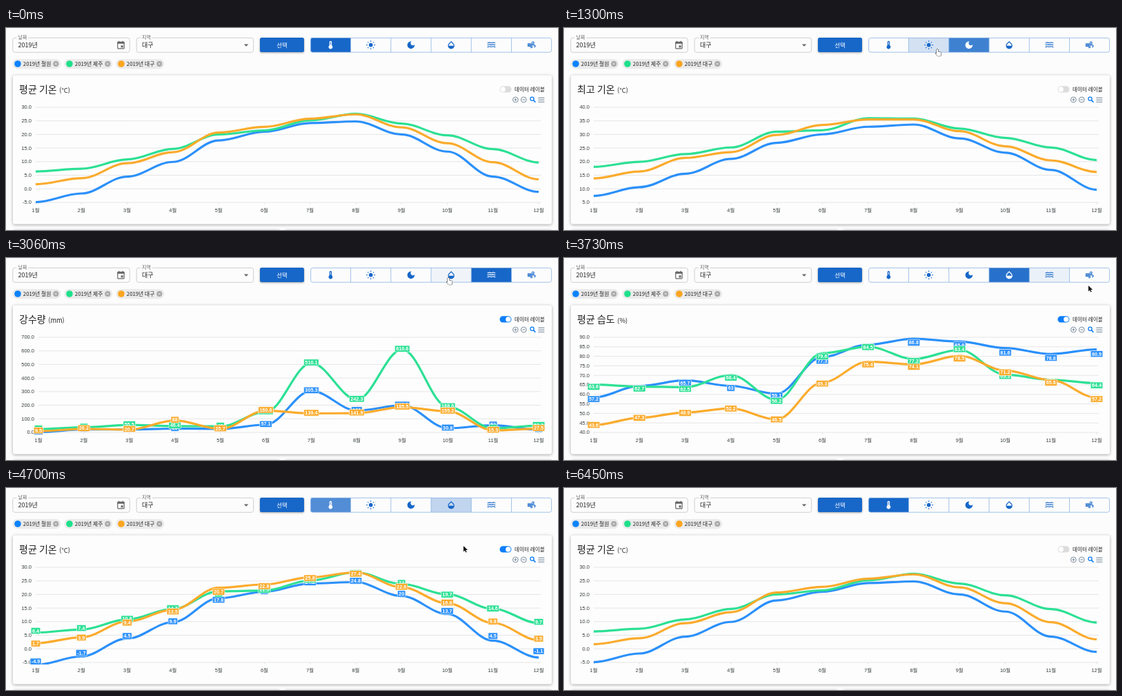
Animation of 800 by 293 pixels, one loop 6.48 s. Source, as an HTML page with a canvas:

```html
<!DOCTYPE html>
<html lang="ko">
<head>
<meta charset="utf-8">
<style>
html, body { margin: 0; width: 100%; height: 100%; overflow: hidden; background: #fcfcfc; }
canvas { display: block; width: 800px; height: 293px; }
</style>
</head>
<body>
<canvas id="stage" width="800" height="293"></canvas>
<script>
const c = document.getElementById('stage').getContext('2d');
const LOOP = 6480, TOP = 115, BOTTOM = 253, RIGHT = 772;
const KR = '"Noto Sans CJK KR", "Noto Sans KR", "Noto Sans CJK", sans-serif';
const LATIN = '"Liberation Sans", Arial, "Noto Sans CJK KR", sans-serif';
const BLUE = '#1767c9', LINES = ['#2b90fa', '#2ce094', '#fbab2c'];

// One row per city: Cheorwon, Jeju, Daegu
const mean = [
  [-4.9, -1.7, 4.5, 9.9, 17.8, 21, 24.2, 24.8, 20, 13.7, 4.5, -1.1],
  [6.4, 7.4, 10.8, 14.7, 20, 21.5, 25.2, 27.6, 24, 19.7, 14.6, 9.7],
  [1.7, 3.9, 9.4, 13.5, 20.7, 22.8, 25.8, 27.4, 22.6, 16.8, 9.8, 3.5]];
const high = [
  [7.6, 13.2, 17.1, 27.6, 32.9, 32.1, 34.5, 35, 30.5, 27.7, 20.8, 11.3],
  [12.5, 18.4, 22, 25, 33.1, 29.8, 35.4, 34.7, 30.4, 27.5, 24.2, 18.7],
  [12.5, 15.7, 24.2, 27.1, 34.5, 35.7, 36, 36.9, 32.5, 28.8, 23.2, 16.8]];
const low = [
  [-16.6, -12.1, -5, 2.6, 11.1, 15.7, 19.7, 20.9, 13.6, 6, -3.1, -13.4],
  [-1.1, 1.4, 5.4, 8.9, 17.1, 18, 24.3, 24.1, 18.9, 14, 8.9, 2.3],
  [-7.3, -3.7, 3.3, 6.3, 15.3, 20.6, 23.6, 23.6, 17.4, 9.4, 2, -4]];
const humid = [
  [57.2, 62.9, 65.7, 63, 59.1, 77.3, 84.6, 86.8, 85.6, 81.6, 78.8, 80.9],
  [63.6, 62.7, 62.5, 68.4, 56.2, 79.6, 84.5, 77.2, 83.4, 69.3, 66, 64.4],
  [43.6, 47.3, 49.9, 52.2, 46.5, 65.3, 75.4, 74.1, 78.5, 71.2, 65.8, 57.2]];
const rain = [
  [1.8, 22, 22.4, 28, 26, 57.1, 305.3, 161, 199.5, 30.8, 53, 20],
  [25, 38, 55.5, 46.4, 45, 150.3, 510.1, 242.3, 610.6, 188.6, 30, 50.2],
  [9.5, 26.2, 20.7, 88, 25.7, 160.8, 139.4, 141.9, 185.5, 155.2, 15.3, 27.5]];

const chart = (title, unit, data, min, max, step, left = 43) => ({
  title, unit, min, max, step, left, data,
  points: data.map(row => row.map((v, i) => [
    left + (RIGHT - left) * i / 11,
    BOTTOM - (v - min) / (max - min) * (BOTTOM - TOP)]))
});
const charts = [
  chart('평균 기온', '(°C)', mean, -5, 30, 5),
  chart('최고 기온', '(°C)', high, 5, 40, 5),
  chart('최저 기온', '(°C)', low, -20, 30, 10, 45),
  chart('평균 습도', '(%)', humid, 40, 90, 5),
  chart('강수량', '(mm)', rain, 0, 700, 100, 47)];

// Timeline: [time, tab], the label switch, and [time, x, y] of the pointer
const clicks = [[-1000, 0], [560, 2], [1245, 1], [2620, 4], [3540, 3], [4555, 0]];
const LABELS_ON = 1790, LABELS_OFF = 5520;
const moves = [[60, 602, -9], [400, 590, 26], [640, 588, 27], [1000, 535, 25], [1245, 536, 27],
  [1300, 541, 31], [1700, 724, 88], [1880, 724, 88], [2220, 697, 23], [2680, 697, 23],
  [3060, 641, 29], [3560, 643, 27], [3730, 760, 40], [4020, 758, 38], [4420, 470, 26],
  [4570, 470, 25], [4700, 663, 84], [5050, 722, 88], [6020, 724, 89]];

const clamp = v => Math.max(0, Math.min(1, v));
const mix = (a, b, p) => a + (b - a) * p;
const smooth = p => p * p * (3 - 2 * p);
const fade = p => 1 - (1 - p) ** 2.6 * (1 + 2.6 * p);
const backOut = p => 1 + 2.70158 * (p - 1) ** 3 + 1.70158 * (p - 1) ** 2;

function text(s, x, y, size, color = '#222', { font = KR, weight = 400, align = 'left' } = {}) {
  c.font = `${weight} ${size}px ${font}`;
  c.textAlign = align;
  c.textBaseline = 'alphabetic';
  c.fillStyle = color;
  c.fillText(s, x, y);
  return c.measureText(s).width;
}
function box(x, y, w, h, r, fill, stroke) {
  c.beginPath();
  c.roundRect(x, y, w, h, r);
  if (fill) { c.fillStyle = fill; c.fill(); }
  if (stroke) { c.strokeStyle = stroke; c.stroke(); }
}
function disc(x, y, r, fill) {
  c.beginPath();
  c.arc(x, y, r, 0, 7);
  c.fillStyle = fill;
  c.fill();
}
function lines(color, width, ...segments) {
  c.beginPath();
  for (const [x, y, x2, y2] of segments) { c.moveTo(x, y); c.lineTo(x2, y2); }
  c.strokeStyle = color;
  c.lineWidth = width;
  c.stroke();
}
function shadowed(blur, dy, draw) {
  c.save();
  c.shadowColor = 'rgba(0,0,0,.35)';
  c.shadowBlur = blur;
  c.shadowOffsetY = dy;
  draw();
  c.restore();
}

// Icons on a 24-unit grid
const icons = [
  { fill: 'M15 13V5c0-1.66-1.34-3-3-3S9 3.34 9 5v8c-1.21.91-2 2.37-2 4 0 2.76 2.24 5 5 5s5-2.24 5-5c0-1.63-.79-3.09-2-4zm-4-8c0-.55.45-1 1-1s1 .45 1 1h-1v1h1v2h-1v1h1v2h-2V5z' },
  { fill: 'M12 7a5 5 0 1 0 .01 0z', line: 'M12 1v3M12 20v3M1 12h3M20 12h3M4.5 4.5l1.8 1.8M17.7 17.7l1.8 1.8M4.5 19.5l1.8-1.8M17.7 6.3l1.8-1.8' },
  { fill: 'M12 3c-4.97 0-9 4.03-9 9s4.03 9 9 9 9-4.03 9-9c0-.46-.04-.92-.1-1.36-.98 1.37-2.58 2.26-4.4 2.26-2.98 0-5.4-2.42-5.4-5.4 0-1.81.89-3.42 2.26-4.4C12.92 3.04 12.46 3 12 3z' },
  { fill: 'M17.66 8L12 2.35 6.34 8C4.78 9.56 4 11.64 4 13.64s.78 4.11 2.34 5.67 3.61 2.35 5.66 2.35 4.1-.79 5.66-2.35S20 15.64 20 13.64 19.22 9.56 17.66 8zM6 14c.01-2 .62-3.27 1.76-4.4L12 5.27l4.24 4.38C17.38 10.77 17.99 12 18 14H6z' },
  { line: [7, 12, 17].map(y => `M2 ${y}q2.5 0 4-1t3.5 0 5 0 4 0 3.5 1`).join('') },
  { fill: 'M14.5 17c0 1.65-1.35 3-3 3s-3-1.35-3-3h2c0 .55.45 1 1 1s1-.45 1-1-.45-1-1-1H2v-2h9.5c1.65 0 3 1.35 3 3zM19 6.5C19 4.57 17.43 3 15.5 3S12 4.57 12 6.5h2c0-.83.67-1.5 1.5-1.5s1.5.67 1.5 1.5S16.33 8 15.5 8H2v2h13.5c1.93 0 3.5-1.57 3.5-3.5zm-.5 4.5H2v2h16.5c.83 0 1.5.67 1.5 1.5s-.67 1.5-1.5 1.5v2c1.93 0 3.5-1.57 3.5-3.5S20.43 11 18.5 11z' }
].map(({ fill, line }) => ({ fill: new Path2D(fill || ''), line: new Path2D(line || '') }));

function icon({ fill, line }, x, y, color) {
  c.save();
  c.translate(x - 7, y - 7);
  c.scale(14 / 24, 14 / 24);
  c.fillStyle = c.strokeStyle = color;
  c.lineWidth = 2;
  c.fill(fill);
  c.stroke(line);
  c.restore();
}

function field(x, label, labelX, value) {
  c.lineWidth = 0.8;
  box(x, 14.3, 169.5, 21, 3, null, '#c4c4c4');
  c.fillStyle = '#fcfcfc';
  c.fillRect(labelX - 2, 12, 17, 4);
  text(label, labelX, 16.4, 7, '#666');
  text(value, labelX, 28.2, 9);
}

function controls() {
  field(9.8, '날짜', 17.5, '2019년');
  field(189.2, '지역', 197, '대구');
  c.lineWidth = 1.2;
  box(161.8, 20.3, 9.4, 9.6, 1, null, '#666');
  c.fillStyle = '#666';
  c.fillRect(161.5, 20, 10, 2.8);
  c.fillRect(163, 18.8, 1.3, 2);
  c.fillRect(168.7, 18.8, 1.3, 2);
  c.fillRect(166.6, 25.3, 3, 3);
  c.beginPath();
  c.moveTo(344.8, 23.4); c.lineTo(351.4, 23.4); c.lineTo(348.1, 26.8);
  c.fill();
  shadowed(3, 1, () => box(368, 14, 64, 21, 2.5, BLUE));
  text('선택', 400, 28, 8.5, '#fff', { weight: 500, align: 'center' });

  ['철원', '제주', '대구'].forEach((city, i) => {
    const x = 9.3 + i * 75;
    box(x, 45, 70, 14.2, 7.1, '#ebebeb');
    disc(x + 7.7, 52, 4.8, ['#0d83fb', '#1fe08b', '#fba521'][i]);
    text('2019년 ' + city, x + 15.5, 55, 7.8);
    disc(x + 63, 52, 4, '#a6a6a6');
    lines('#ebebeb', 1, [x + 61.4, 50.4, x + 64.6, 53.6], [x + 64.6, 50.4, x + 61.4, 53.6]);
  });
}

function tabs(now, current, previous, p, pointer) {
  const w = 349.5 / 6;
  c.save();
  c.beginPath();
  c.roundRect(441.3, 14, 349.5, 21.3, 3);
  c.clip();
  icons.forEach((shape, i) => {
    const x = 441.3 + i * w;
    const level = i === current ? p : i === previous ? 1 - p : 0;
    const hover = pointer && pointer.y > 14 && pointer.y < 35 && pointer.x > x && pointer.x < x + w;
    c.fillStyle = BLUE;
    c.globalAlpha = Math.max(level, hover ? 0.05 : 0);
    c.fillRect(x, 14, w, 21.3);
    c.globalAlpha = 1;
    icon(shape, x + w / 2, 24.7, level > 0.5 ? '#fff' : BLUE);
    if (i) lines('#8bb4e3', 0.8, [x, 14, x, 35.3]);
  });
  c.restore();
  c.lineWidth = 0.8;
  box(441.6, 14.4, 349, 20.8, 3, null, '#8bb4e3');
}

function toolbar(on) {
  const track = on > 0.5 ? '#0d7ef9' : '#dcdcdc';
  box(715.5, 84.3, 17, 9.2, 4.6, track);
  disc(mix(720.2, 727.8, on), 88.9, 3.7, '#fff');
  text('데이터 레이블', 737, 91.6, 7.6, '#222', { weight: 500 });
  const gray = '#6e8192';
  for (const x of [738.4, 750.3]) {
    c.lineWidth = 0.9;
    c.beginPath();
    c.arc(x, 104, 3.9, 0, 7);
    c.strokeStyle = gray;
    c.stroke();
    lines(gray, 0.9, [x - 2, 104, x + 2, 104]);
  }
  lines(gray, 0.9, [738.4, 102, 738.4, 106]);
  c.beginPath();
  c.arc(762.5, 102.7, 2.6, 0, 7);
  c.strokeStyle = '#0d7ef9';
  c.lineWidth = 1.3;
  c.stroke();
  lines('#0d7ef9', 1.6, [764.4, 104.6, 767.4, 107.6]);
  lines(gray, 1.1, ...[101.2, 104.2, 107.2].map(y => [771.3, y, 780.3, y]));
}

function plot(view, from, p, labels) {
  const w = text(view.title, 19, 93.6, 14);
  text(view.unit, 19 + w + 3.6, 94, 9.3);
  const count = (view.max - view.min) / view.step;
  for (let i = 0; i <= count; i++) {
    const y = mix(BOTTOM, TOP, i / count);
    lines('#e0e0e0', 0.8, [view.left, y, 775, y]);
    text((view.min + i * view.step).toFixed(1), view.left - 6, y + 2.4, 7.5, '#373d3f', { font: LATIN, align: 'right' });
  }
  for (let m = 0; m < 12; m++) {
    const x = mix(view.left, RIGHT, m / 11);
    lines('#e0e0e0', 0.8, [x, BOTTOM, x, BOTTOM + 3]);
    text(m + 1 + '월', x, 267.3, 7.4, '#373d3f', { font: LATIN, align: 'center' });
  }
  c.save();
  c.beginPath();
  c.rect(40, 110, 736, 146);
  c.clip();
  view.points.forEach((row, s) => {
    c.beginPath();
    let px, py;
    row.forEach(([x, ty], i) => {
      const y = mix(from.points[s][i][1], ty, p);
      if (i) {
        const reach = (x - px) * 0.35;
        c.bezierCurveTo(px + reach, py, x - reach, y, x, y);
      } else c.moveTo(x, y);
      [px, py] = [x, y];
    });
    c.strokeStyle = LINES[s];
    c.lineWidth = 3.2;
    c.stroke();
  });
  c.restore();
  if (!labels) return;
  view.points.forEach((row, s) => row.forEach(([x, y], i) => {
    const value = String(view.data[s][i]);
    c.font = `700 7.3px ${LATIN}`;
    const bw = c.measureText(value).width + 3.4;
    c.lineWidth = 0.6;
    box(x - bw / 2, y - 5.6, bw, 9.3, 1, LINES[s], '#fff');
    text(value, x, y + 1.6, 7.3, '#fff', { font: LATIN, weight: 700, align: 'center' });
  }));
}

function pointerAt(t) {
  const i = moves.findIndex(m => m[0] > t);
  if (i < 1) return null;
  const [a, b] = [moves[i - 1], moves[i]];
  const p = smooth((t - a[0]) / (b[0] - a[0]));
  return { x: mix(a[1], b[1], p), y: mix(a[2], b[2], p) };
}

const arrow = new Path2D('M0 0v8.4l2-1.8 1.3 2.9 1.4-.6-1.3-2.8h2.7z');
const hand = new Path2D('M-1 0q1-1 2 0v3.2l3.6.9q1.2.4 1 1.8l-.6 3.8h-4.6l-3-3.6q-.4-1.2 1.6-.2z');
function drawPointer({ x, y }) {
  const overTab = y > 14 && y < 36 && x > 441;
  const overSwitch = y > 83 && y < 95 && x > 715 && x < 734;
  const isHand = overTab || overSwitch;
  c.save();
  c.translate(x, y);
  c.lineWidth = isHand ? 0.9 : 1;
  c.strokeStyle = isHand ? '#111' : '#fff';
  c.fillStyle = isHand ? '#fff' : '#111';
  c.stroke(isHand ? hand : arrow);
  c.fill(isHand ? hand : arrow);
  c.restore();
}

function draw(t) {
  const n = clicks.findLastIndex(k => k[0] <= t);
  const [start, current] = clicks[n];
  const previous = n ? clicks[n - 1][1] : current;
  const age = t - start;
  const pointer = pointerAt(t);
  const on = smooth(clamp((t - LABELS_ON) / 150)) - smooth(clamp((t - LABELS_OFF) / 150));

  c.fillStyle = '#fcfcfc';
  c.fillRect(0, 0, 800, 293);
  controls();
  tabs(t, current, previous, fade(clamp(age / 250)), pointer);
  shadowed(4, 1, () => box(10, 68.5, 781, 216, 3, '#fdfdfd'));
  shadowed(2, 0, () => {
    box(10, 292.4, 387, 20, 3, '#fdfdfd');
    box(404, 292.4, 387, 20, 3, '#fdfdfd');
  });
  toolbar(on);
  plot(charts[current], charts[previous], backOut(clamp((age - 55) / 185)), t >= LABELS_ON && t < LABELS_OFF);
  if (pointer) drawPointer(pointer);
}

const begin = performance.now();
function frame() {
  draw((performance.now() - begin) % LOOP);
  requestAnimationFrame(frame);
}
frame();
</script>
</body>
</html>
```
